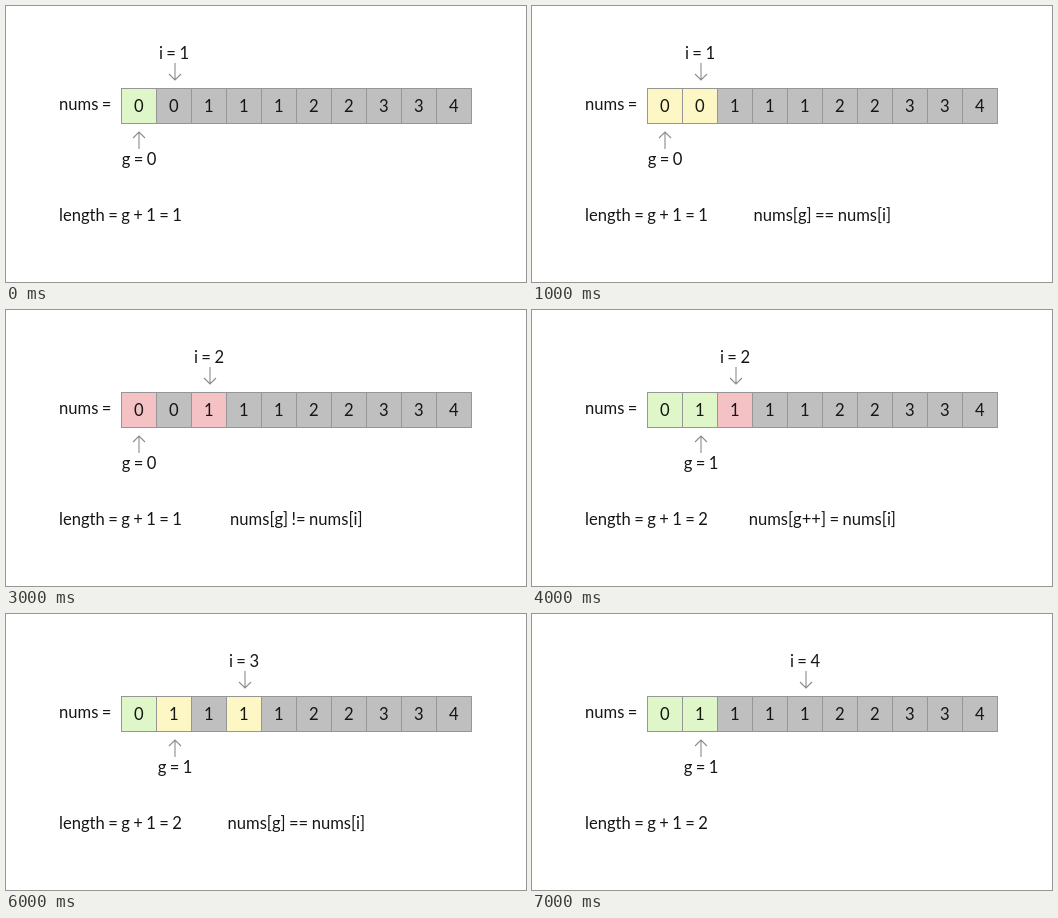
An HTML page that plays this animation: 520x276 px, repeating every 8000 ms.

```html
<!DOCTYPE html>
<html lang="en">
<head>
<meta charset="utf-8">
<title>Remove duplicates from a sorted array</title>
<style>
  html, body { margin: 0; width: 100%; height: 100%; overflow: hidden; background: #fff; }
  svg { display: block; }
  text { font: 16.6px Lato, "Open Sans", sans-serif; word-spacing: -0.85px; fill: #161616; }
  .mid { text-anchor: middle; }
  .cell { stroke: #969696; }
  .arrow { fill: none; stroke: #8c8c8c; stroke-width: 1.1; }
</style>
</head>
<body>
<svg id="stage" width="520" height="276" viewBox="0 0 520 276"></svg>
<script>
const STEP = 1000, LEFT = 115.5, TOP = 82.5, SIZE = 35;
const GREY = '#bfbfbf', GREEN = '#dff6c8', RED = '#f4c1c5', YELLOW = '#fdf7c5';
const before = [0, 0, 1, 1, 1, 2, 2, 3, 3, 4];
const after = [0, 1, 1, 1, 1, 2, 2, 3, 3, 4];

// Each step: pointers, highlighted cells and the comparison shown
const steps = [
  { i: 1, g: 0 },
  { i: 1, g: 0, marks: { 0: YELLOW, 1: YELLOW }, note: 'nums[g] == nums[i]' },
  { i: 2, g: 0 },
  { i: 2, g: 0, marks: { 0: RED, 2: RED }, note: 'nums[g] != nums[i]' },
  { i: 2, g: 1, marks: { 2: RED }, note: 'nums[g++] = nums[i]' },
  { i: 3, g: 1 },
  { i: 3, g: 1, marks: { 1: YELLOW, 3: YELLOW }, note: 'nums[g] == nums[i]' },
  { i: 4, g: 1 },
];

const label = (x, y, s, cls = '') => `<text x="${x}" y="${y}" class="${cls}">${s}</text>`;
const centre = (x, y, s) => label(x, y, s, 'mid');
const arrow = (x, tail, tip) => {
  const wing = tip - Math.sign(tip - tail) * 6;
  return `<path class="arrow" d="M${x} ${tail}V${tip}M${x - 6} ${wing}L${x} ${tip}L${x + 6} ${wing}"/>`;
};

function render({ i, g, marks = {}, note = '' }) {
  const cells = (g ? after : before).map((n, k) => {
    const x = LEFT + k * SIZE;
    const fill = marks[k] || (k <= g ? GREEN : GREY);
    return `<rect class="cell" x="${x}" y="${TOP}" width="${SIZE}" height="${SIZE}" fill="${fill}"/>`
      + centre(x + SIZE / 2 - 0.2, 106, n);
  });
  const iX = 133 + i * SIZE, gX = 133 + g * 36;
  return cells.join('')
    + label(53, 104, 'nums =')
    + centre(iX, 53, `i = ${i}`) + arrow(iX + 1, 57, 74)
    + centre(gX, 159, `g = ${g}`) + arrow(gX, 143, 126)
    + label(53, 215, `length = g + 1 = ${g + 1}`)
    + centre(290.3, 215, note);
}

const stage = document.getElementById('stage');
let shown = -1;
function tick() {
  const now = Math.floor(performance.now() / STEP) % steps.length;
  if (now !== shown) stage.innerHTML = render(steps[shown = now]);
  requestAnimationFrame(tick);
}
tick();
</script>
</body>
</html>
```
